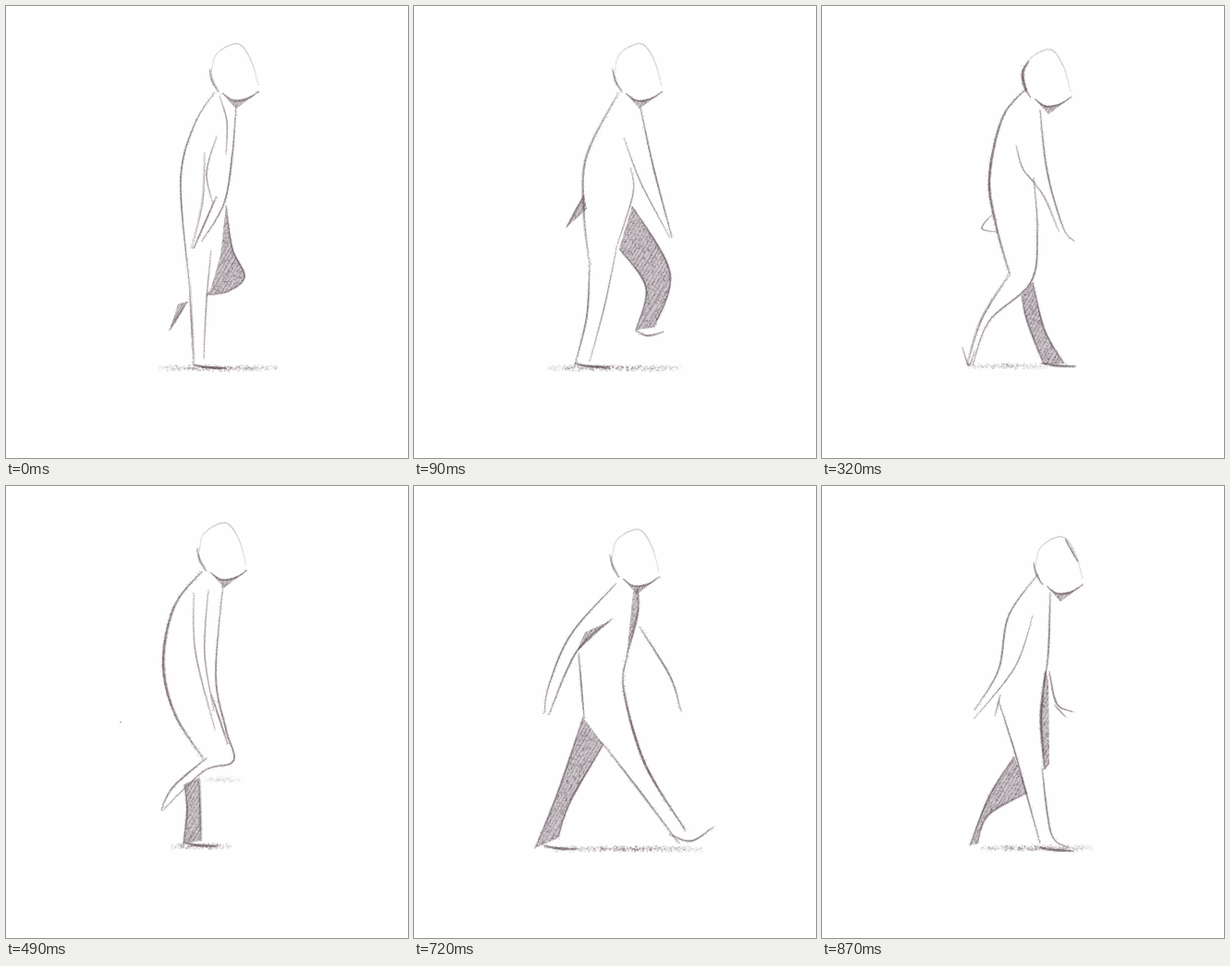
Animation, 435 px wide and 488 px high, one loop 950 ms. Source, as an HTML page with a canvas:

```html
<!DOCTYPE html>
<html lang="en">
<head>
<meta charset="utf-8">
<title>Pencil walk cycle</title>
<style>
html, body { margin: 0; width: 100%; height: 100%; overflow: hidden; background: #fefefe; }
body { position: relative; }
canvas { position: absolute; left: 0; top: 0; animation: walk 950ms step-end infinite; }
@keyframes walk {
  0%       { transform: translateX(0); }
  9.4737%  { transform: translateX(-435px); }
  17.8947% { transform: translateX(-870px); }
  33.6842% { transform: translateX(-1305px); }
  51.5789% { transform: translateX(-1740px); }
  60%      { transform: translateX(-2175px); }
  75.7895% { transform: translateX(-2610px); }
  91.5789%, 100% { transform: translateX(-3045px); }
}
</style>
</head>
<body>
<canvas id="strip" width="3480" height="488"></canvas>
<script>
const W = 435;
const ctx = document.getElementById('strip').getContext('2d');
ctx.fillStyle = ctx.strokeStyle = '#503c48';

let seed = 7;
const rnd = () => {
  seed = (seed * 1664525 + 1013904223) >>> 0;
  return seed / 4294967296;
};
const spread = n => (rnd() + rnd() - 1) * n;

function dot(x, y, size, alpha) {
  ctx.globalAlpha = alpha;
  ctx.fillRect(x - size / 2, y - size / 2, size, size);
}

function pts(...n) {
  const out = [];
  for (let i = 0; i < n.length; i += 2) out.push([n[i], n[i + 1]]);
  return out;
}

// Catmull-Rom curve sampled about every 1.5 px
function curve(p) {
  const out = [];
  for (let i = 0; i < p.length - 1; i++) {
    const b = p[i], c = p[i + 1], a = p[i - 1] || b, d = p[i + 2] || c;
    const n = Math.ceil(Math.hypot(c[0] - b[0], c[1] - b[1]) / 1.5);
    for (let k = 0; k < n; k++) {
      const t = k / n;
      out.push([0, 1].map(j => b[j] + t / 2 * (c[j] - a[j]
        + t * (2 * a[j] - 5 * b[j] + 4 * c[j] - d[j]
        + t * (3 * (b[j] - c[j]) + d[j] - a[j])))));
    }
  }
  out.push(p[p.length - 1]);
  return out;
}

function trace(path, dark, width, dx, dy) {
  for (let i = 1; i < path.length; i++) {
    const [x, y] = path[i - 1], [u, v] = path[i];
    const press = 0.5 + 0.5 * Math.sin(Math.PI * i / path.length);
    ctx.globalAlpha = dark * press * (0.65 + 0.35 * rnd());
    ctx.lineWidth = width * press;
    ctx.beginPath();
    ctx.moveTo(x + dx, y + dy);
    ctx.lineTo(u + dx, v + dy);
    ctx.stroke();
    dot(u + spread(width * 1.3), v + spread(width * 1.3), 1.1, dark * 0.35);
  }
}

// Each pencil draws a curve and returns its sampled path
const pencil = (dark, width) => (...n) => {
  const path = curve(pts(...n));
  trace(path, dark * 0.8, width * 0.8, 0, 0);
  trace(path, dark * 0.3, width * 0.9, spread(1.6), spread(1));
  return path;
};
const faint = pencil(0.28, 1.4);
const thin = pencil(0.55, 1.7);
const line = pencil(0.7, 2.2);
const bold = pencil(0.9, 3);

// Hatching between two edges
function tone(a, b, dark = 0.75) {
  const edge = [...a, ...[...b].reverse()];
  const xs = edge.map(p => p[0]), ys = edge.map(p => p[1]);
  const x0 = Math.min(...xs), y0 = Math.min(...ys);
  const w = Math.max(...xs) - x0, h = Math.max(...ys) - y0;
  ctx.save();
  ctx.beginPath();
  edge.forEach(p => ctx.lineTo(...p));
  ctx.clip();
  ctx.globalAlpha = dark * 0.36;
  ctx.fillRect(x0, y0, w, h);
  ctx.lineWidth = 1.2;
  for (let x = x0 - h; x < x0 + w; x += 4) {
    ctx.globalAlpha = dark * (0.2 + 0.25 * rnd());
    ctx.beginPath();
    ctx.moveTo(x + spread(2), y0 + h);
    ctx.lineTo(x + h * 0.6, y0);
    ctx.stroke();
  }
  for (let n = w * h * 0.2; n > 0; n--)
    dot(x0 + rnd() * w, y0 + rnd() * h, 1.3, dark * 0.35);
  ctx.restore();
}

function ground(x0, x1, y, dark = 0.7) {
  for (let n = (x1 - x0) * 3.5; n > 0; n--) {
    const t = rnd();
    dot(x0 + t * (x1 - x0), y + spread(4), 1.4,
      dark * 0.3 * (0.25 + 0.75 * Math.sin(Math.PI * t)));
  }
}

function head(x, y) {
  faint(x - 25, y + 31, x - 20, y + 12, x - 4, y + 1, x + 8, y + 2, x + 19, y + 20, x + 26, y + 45);
  line(x - 27, y + 27, x - 24, y + 40, x - 17, y + 52);
  const chin = line(x - 13, y + 53, x - 1, y + 61, x + 14, y + 59, x + 27, y + 51);
  tone(chin, pts(x + 2, y + 70));
}

const foot = (x, y) => bold(x, y - 2, x + 15, y + 1, x + 37, y + 2);

const poses = [
  // near leg carries, far leg passes
  () => {
    head(247, 41);
    line(226, 93, 204, 128, 189, 188, 198, 298);
    line(249, 108, 245, 160, 236, 213, 212, 254);
    thin(231, 97, 239, 125, 238, 160);
    thin(228, 140, 217, 180, 224, 214);
    thin(215, 158, 213, 210, 201, 262);
    line(228, 205, 203, 262);
    const knee = line(238, 215, 245, 262, 258, 292, 240, 308, 217, 312);
    tone(knee, pts(232, 270, 222, 304));
    thin(222, 264, 217, 320, 214, 381);
    line(198, 298, 200, 330, 203, 386);
    tone(line(196, 319, 177, 350), pts(186, 322));
    foot(202, 389);
    ground(165, 295, 391);
  },
  // far leg swings forward
  () => {
    head(242, 41);
    line(222, 93, 187, 162, 184, 222, 190, 278);
    line(245, 110, 259, 174, 279, 250);
    thin(227, 142, 246, 192, 277, 250);
    thin(234, 174, 237, 202, 220, 257);
    tone(line(184, 204, 165, 239), pts(187, 219));
    const shin = line(236, 216, 277, 288, 260, 347);
    tone(shin, line(222, 262, 251, 304, 240, 350));
    line(239, 350, 252, 356, 270, 352);
    thin(220, 258, 206, 325, 190, 384);
    line(190, 278, 187, 335, 174, 388);
    foot(174, 388);
    ground(145, 290, 391);
  },
  // contact, far leg ahead
  () => {
    head(236, 46);
    thin(248, 48, 255, 68, 264, 96);
    line(217, 95, 190, 140, 178, 190, 181, 225, 179, 268);
    thin(181, 182, 150, 215, 128, 235);
    tone(line(178, 190, 150, 241), pts(180, 184, 148, 218));
    line(240, 112, 279, 180, 290, 213, 296, 256);
    line(231, 157, 270, 195, 293, 240);
    line(237, 162, 233, 215, 218, 260, 178, 315, 148, 388);
    line(179, 268, 150, 345, 130, 389);
    foot(130, 388);
    const shin = line(233, 228, 265, 312, 303, 378);
    tone(shin, line(214, 272, 240, 313, 300, 382));
    line(287, 376, 301, 383, 332, 364);
    ground(155, 290, 384);
    ground(302, 338, 390, 0.5);
  },
  // weight lands on far leg
  () => {
    head(243, 47);
    bold(224, 59, 217, 72, 221, 91);
    bold(221, 89, 195, 121, 181, 185, 188, 236, 203, 290);
    thin(185, 224, 173, 240, 189, 244);
    line(236, 112, 244, 180, 261, 239, 273, 254);
    thin(210, 150, 217, 175, 230, 191);
    thin(222, 182, 240, 206, 256, 243);
    line(229, 185, 233, 244, 226, 298, 181, 340, 163, 388);
    line(203, 290, 173, 338, 157, 388);
    thin(152, 368, 159, 388, 165, 372);
    const shin = line(228, 298, 241, 350, 262, 386);
    tone(shin, line(216, 312, 222, 340, 240, 387));
    foot(238, 387);
    ground(158, 245, 389, 0.45);
  },
  // far leg carries, near leg passes
  () => {
    head(234, 40);
    bold(212, 92, 182, 130, 170, 190, 182, 245, 213, 294);
    thin(203, 115, 205, 180, 226, 263);
    thin(219, 112, 215, 180, 225, 243);
    line(235, 105, 227, 205, 238, 263, 246, 297, 214, 308, 170, 350);
    line(222, 225, 240, 279);
    line(218, 293, 181, 325, 168, 350);
    const shin = line(209, 315, 211, 383);
    tone(shin, line(193, 322, 196, 350, 192, 386));
    foot(192, 387);
    ground(178, 244, 389);
    ground(213, 256, 317, 0.25);
    dot(124, 255, 2, 0.3);
  },
  // near leg swings forward
  () => {
    head(236, 41);
    bold(215, 96, 184, 140, 175, 198, 198, 272);
    line(207, 126, 185, 184, 181, 260);
    thin(216, 138, 200, 197, 187, 255);
    line(239, 108, 228, 206, 251, 265, 268, 290, 263, 314, 270, 350);
    thin(240, 148, 256, 202, 273, 242);
    thin(234, 176, 257, 239);
    line(204, 275, 244, 305, 253, 354);
    line(253, 356, 268, 362, 288, 354);
    const shin = line(198, 272, 186, 336, 166, 389);
    tone(shin, line(218, 289, 202, 350, 188, 387));
    foot(166, 388);
    ground(150, 285, 391);
  },
  // contact, near leg ahead
  () => {
    head(239, 47);
    line(219, 105, 170, 160, 146, 215, 141, 246);
    line(215, 143, 176, 179, 146, 247);
    tone(pts(213, 145, 176, 179), pts(185, 158));
    line(178, 180, 181, 215, 184, 251);
    tone(line(242, 110, 242, 138, 230, 184), pts(237, 115));
    bold(231, 183, 227, 220, 250, 300, 294, 372);
    line(244, 152, 277, 205, 289, 243);
    line(203, 276, 245, 330, 287, 386);
    line(276, 376, 300, 383, 324, 368);
    const calf = line(183, 250, 156, 330, 131, 391);
    tone(calf, line(205, 279, 169, 341, 156, 380));
    foot(140, 390);
    ground(150, 312, 392);
  },
  // weight lands on near leg
  () => {
    head(256, 55);
    line(263, 57, 277, 82);
    line(234, 95, 202, 140, 191, 198, 165, 242);
    thin(228, 140, 209, 195, 165, 251);
    thin(193, 225, 187, 248);
    line(247, 115, 245, 180, 240, 214);
    tone(bold(242, 200, 237, 250, 241, 306), pts(245, 210, 246, 300));
    line(246, 200, 254, 235, 272, 244);
    thin(251, 236, 264, 250);
    line(191, 232, 208, 285, 226, 350, 236, 386);
    line(238, 304, 248, 375, 267, 390);
    const shin = line(208, 292, 181, 335, 160, 388);
    tone(shin, line(222, 331, 180, 355, 168, 386));
    foot(235, 392);
    ground(172, 293, 391);
  }
];

poses.forEach((draw, i) => {
  ctx.setTransform(1, 0, 0, 1, W * i, 0);
  draw();
});
</script>
</body>
</html>
```
